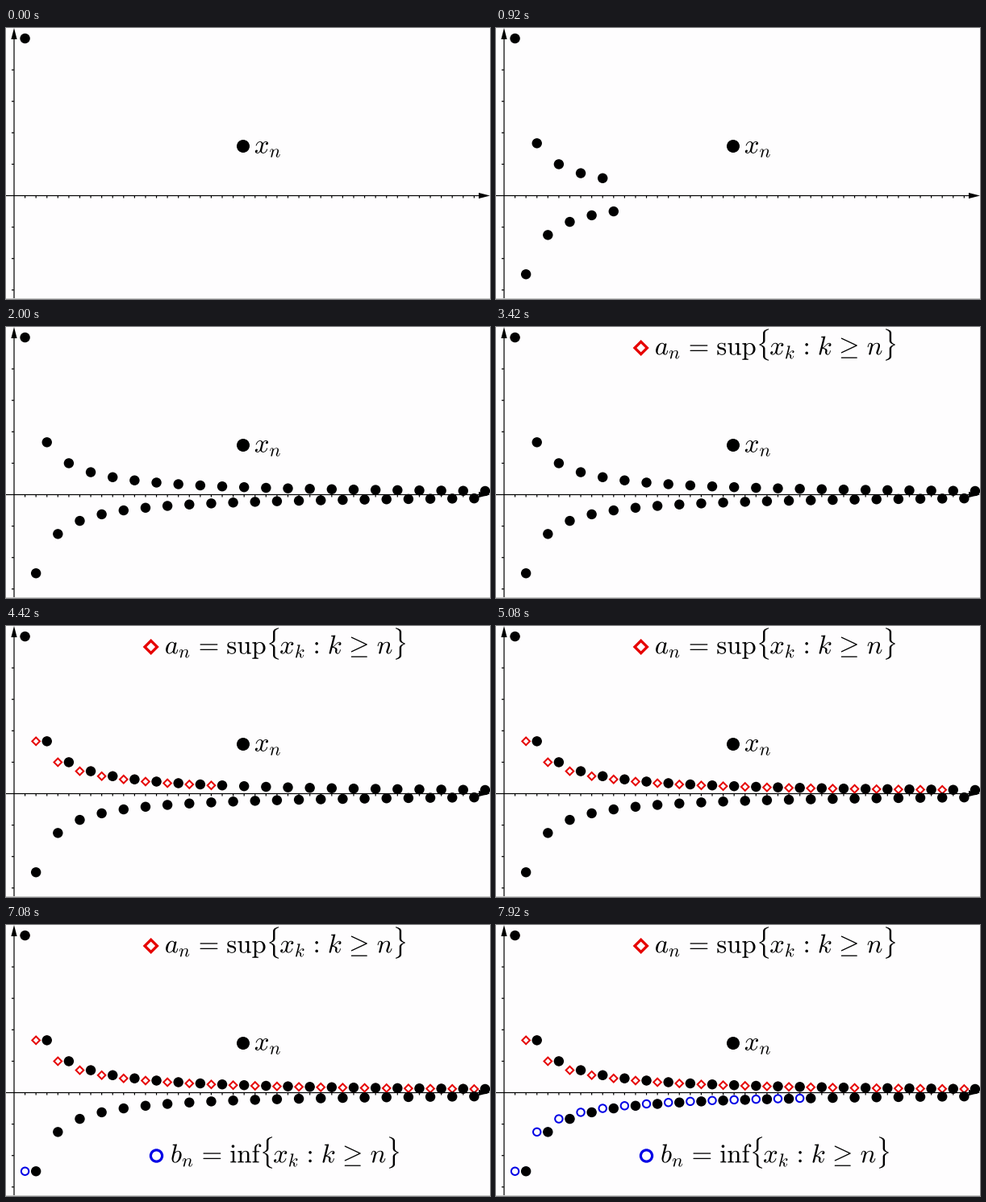
A matplotlib script that plays this animation: 600 px wide and 337 px high, repeating every 8 s.

```python
import matplotlib.pyplot as plt
import numpy as np
from matplotlib.animation import FuncAnimation
from matplotlib.patches import Circle, PathPatch, Polygon
from matplotlib.textpath import TextPath
from matplotlib.transforms import Affine2D

plt.rcParams["mathtext.fontset"] = "cm"

W, H = 600, 337
X0, Y0 = 10.0, 208.5          # origin of the axes
DX, DY = 13.58, 195.5         # pixels per index and per unit
TICK = DY / 5
COUNT = 43
EM = 32.8
PAPER, INK, RED, BLUE = "#fefdfe", "#000000", "#e60000", "#0000e6"

INTERVAL, FRAMES = 40, 200
RATE = 12                     # the picture advances in steps of 1/12 s

fig = plt.figure(figsize=(W / 100, H / 100), dpi=100, facecolor=PAPER)
ax = fig.add_axes([0, 0, 1, 1])
ax.set_xlim(0, W)
ax.set_ylim(H, 0)
ax.axis("off")


def px(width):
    return width * 0.72


def line(x1, y1, x2, y2, width=1.2, color=INK):
    ax.plot([x1, x2], [y1, y2], color=color, lw=px(width), snap=False,
            solid_capstyle="butt", zorder=1)


def add(patch):
    return ax.add_patch(patch)


def dot(x, y, r=6.2):
    return add(Circle((x, y), r, fc=INK, ec="none", zorder=4))


def ring(x, y, r=4.7, width=2.0):
    return add(Circle((x, y), r, fill=False, ec=BLUE, lw=px(width), zorder=3))


def diamond(x, y, r=4.8, width=2.0):
    corners = [(x - r, y), (x, y - r), (x + r, y), (x, y + r)]
    return add(Polygon(corners, fill=False, ec=RED, lw=px(width),
                       joinstyle="miter", zorder=2))


# Advance widths of the math glyphs, in em
ADVANCE = {"a": .529, "b": .429, "n": .6, "x": .572, "k": .521,
           r"\{": .5, r"\}": .5, "=": 1.334, ":": .834, r"\geq": 1.334,
           r"\mathrm{sup}": 1.506, r"\mathrm{inf}": 1.14}
RELATIONS = ("=", ":", r"\geq")


def formula(x, y, tokens):
    """Set tokens on a baseline; a leading underscore marks a subscript."""
    parts = []
    for token in tokens:
        sub = token.startswith("_")
        token = token.lstrip("_")
        size = EM * (0.7 if sub else 1)
        slot = ADVANCE[token] * size
        path = TextPath((0, 0), f"${token}$", size=size)
        shift = 0
        if token in RELATIONS:
            box = path.get_extents()
            shift = (slot - box.x0 - box.x1) / 2
        place = Affine2D().scale(1, -1).translate(
            x + shift, y + (0.15 * EM if sub else 0))
        parts.append(add(PathPatch(path, fc=INK, ec="none", zorder=5,
                                   transform=place + ax.transData)))
        x += slot + (0.05 * EM if sub else 0)
    return parts


def bound(letter, name):
    return [letter, "_n", "=", rf"\mathrm{{{name}}}", r"\{", "x", "_k",
            ":", "k", r"\geq", "n", r"\}"]


# Axes
line(0, Y0, W - 10, Y0)
line(X0, 10, X0, H)
line(0, H - 0.5, W, H - 0.5, 1, "#c8c8c8")
for i in range(1, COUNT):
    line(X0 + i * DX, Y0, X0 + i * DX, Y0 + 3)
for i in (-3, -2, -1, 1, 2, 3, 4):
    line(X0 - 3, Y0 - i * TICK, X0, Y0 - i * TICK)
add(Polygon([(W, Y0), (W - 14, Y0 - 3.6), (W - 14, Y0 + 3.6)], fc=INK, ec="none"))
add(Polygon([(X0, 0), (X0 - 3.6, 14), (X0 + 3.6, 14)], fc=INK, ec="none"))


# Sequence x_n = (-1)^(n+1) / n with its running bounds
def term(n):
    return (-1) ** (n + 1) / n


def sup(n):
    return term(n if n % 2 else n + 1)


def inf(n):
    return term(n + 1 if n % 2 else n)


def series(mark, value, last):
    return [mark(X0 + n * DX, Y0 - DY * value(n)) for n in range(1, last + 1)]


dots = series(dot, term, COUNT)
sups = series(diamond, sup, COUNT - 1)
infs = series(ring, inf, COUNT - 1)

# Legends
dot(294, 147, 8)
formula(307.8, 155.8, ["x", "_n"])
sup_legend = [diamond(179.7, 26, 7.7, 3.3)] + formula(196.8, 34.5, bound("a", "sup"))
inf_legend = [ring(186.5, 287, 7.1, 3.2)] + formula(204, 295.5, bound("b", "inf"))

# Step number against how many marks are shown
DOT_PACE = ([7, 11, 17, 18, 24], [1, 10, 27, 31, 43])
SUP_PACE = ([42, 43, 46, 48, 58, 61, 62], [1, 2, 8, 8, 30, 40, 42])
INF_PACE = ([85, 92, 95], [1, 18, 27])
SUP_START, INF_START = 41, 83


def show(marks, count):
    for i, mark in enumerate(marks):
        mark.set_visible(i < count)


def reveal(step, start, marks, legend, pace):
    on = step >= start
    show(marks, int(np.interp(step, *pace) + 1e-6) if on else 0)
    show(legend, len(legend) if on else 0)


def update(i):
    step = int((i + 0.5) * INTERVAL * RATE / 1000)
    reveal(step, 0, dots, [], DOT_PACE)
    reveal(step, SUP_START, sups, sup_legend, SUP_PACE)
    reveal(step, INF_START, infs, inf_legend, INF_PACE)
    return []


anim = FuncAnimation(fig, update, frames=FRAMES, interval=INTERVAL,
                     repeat=True, repeat_delay=0, init_func=lambda: update(0))
plt.show()
```
